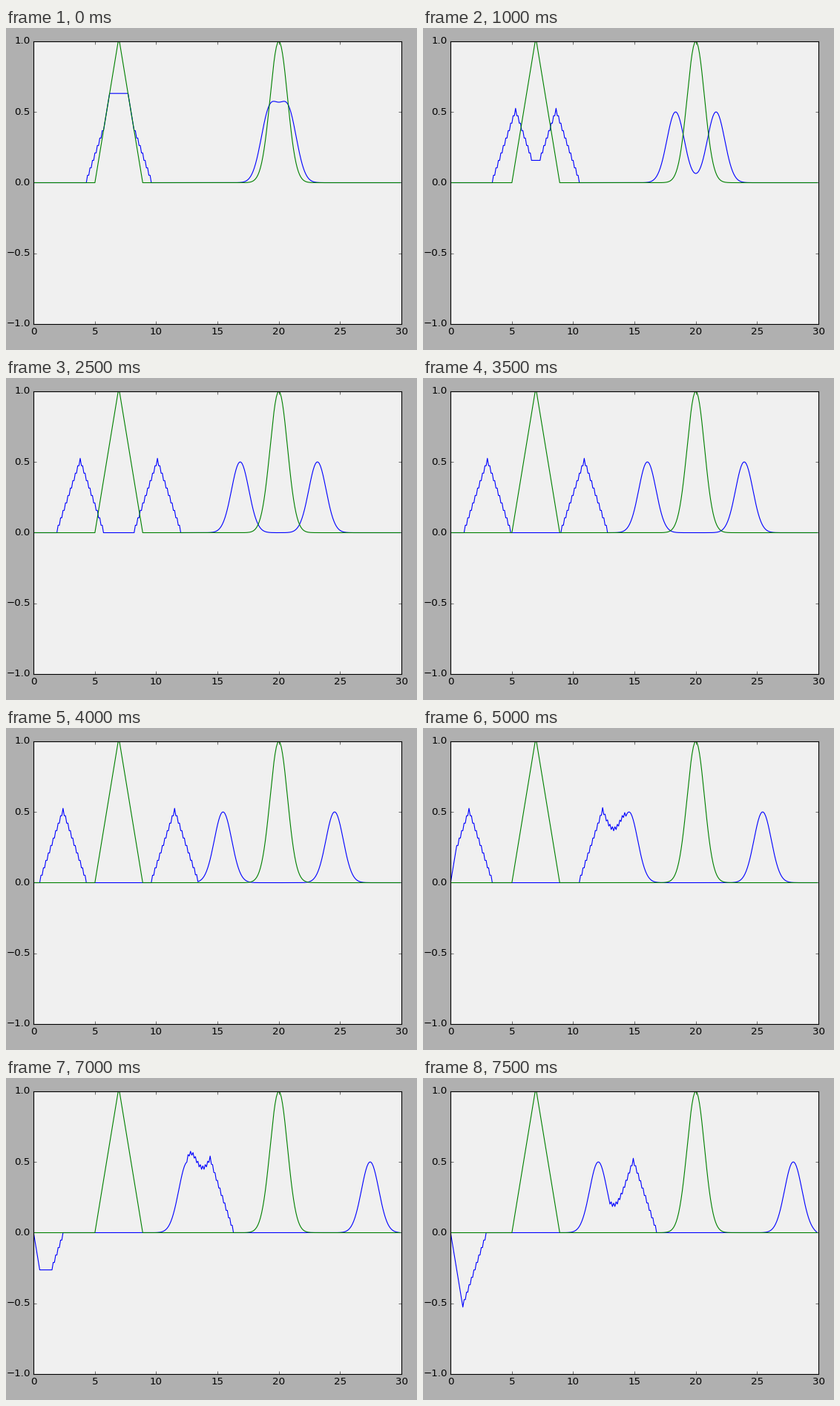
A matplotlib script for the animation above (8000 ms loop, 554 by 434 pixels).

```python
import numpy as np
import matplotlib.pyplot as plt
from matplotlib.animation import FuncAnimation

W, H, DPI = 554, 434, 80
LEFT, RIGHT, TOP, BOTTOM = 37.2, 533.0, 18.0, 399.0

plt.rcParams.update({
    "font.family": "DejaVu Sans",
    "font.size": 12,
    "axes.linewidth": 1.0,
    "lines.linewidth": 1.0,
    "ytick.alignment": "center",
})

# Time steps reached at each half second of the wall clock
STEPS = [8, 11, 17, 20, 27, 32, 37, 40, 46, 49, 55, 61, 67, 71, 75, 80]

x = np.arange(300) * 0.1


def initial_shape():
    """A triangle on the left and a Gaussian bump on the right."""
    u = np.exp(-(x - 20) ** 2)
    u[50:70] = np.linspace(0, 1, 20)
    u[70:90] = np.linspace(1, 0, 20)
    u[0] = u[-1] = 0
    return u


def solve(start, count):
    """Leapfrog wave equation, Courant number 1, both ends held at zero."""
    history = [start, start]
    while len(history) <= count:
        prev, cur = history[-2:]
        new = np.zeros_like(cur)
        new[1:-1] = cur[2:] + cur[:-2] - prev[1:-1]
        history.append(new)
    return history


start = initial_shape()
waves = solve(start, max(STEPS))

fig = plt.figure(figsize=(W / DPI, H / DPI), dpi=DPI, facecolor="#b0b0b0")
ax = fig.add_axes([LEFT / W, 1 - BOTTOM / H, (RIGHT - LEFT) / W, (BOTTOM - TOP) / H],
                  facecolor="#f0f0f0")
wave, = ax.plot(x, waves[STEPS[0]], color=(0, 0, 1))
ax.plot(x, start, color=(0, 0.5, 0))

ax.set_xlim(0, 30)
ax.set_ylim(-1, 1)
ax.set_xticks(range(0, 31, 5))
ax.set_yticks(np.arange(-1, 1.1, 0.5))
ax.tick_params(direction="in", length=4, width=0.5, pad=4, top=True, right=True)


def update(frame):
    wave.set_ydata(waves[STEPS[frame]])
    return wave,


anim = FuncAnimation(fig, update, frames=len(STEPS), interval=500,
                     repeat=True, repeat_delay=0, blit=False)

plt.show()
```
